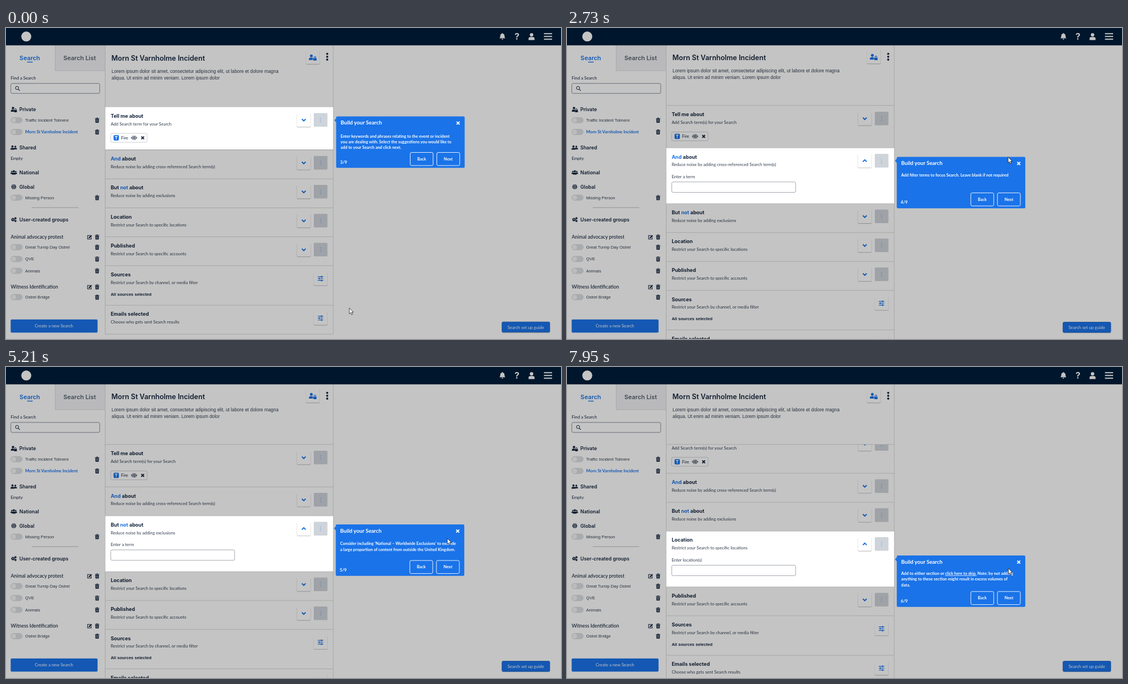
Recreate the animation shown at these times as an HTML page. Size 999x561 px, loop 8000 ms.

```html
<!DOCTYPE html>
<html lang="en">
<head>
<meta charset="utf-8">
<title>Search set up guide</title>
<style>
html, body { margin: 0; width: 100%; height: 100%; overflow: hidden; background: #c4c4c4; }
svg { display: block; width: 100%; height: 100%; }
text { white-space: pre; }
</style>
</head>
<body>
<svg id="stage" viewBox="0 0 999 561"></svg>
<script>
const NAVY = '#16263d', BLUE = '#1a73e8', GREY = '#ced4da', WHITE = '#fff', LINE = '#d3d4d6';
const LOOP = 8000;

// family, weight, size
const FONT = {
  body: ['Lato', 400, 7.72],
  strong: ['Lato', 700, 7.6],
  note: ['Lato', 700, 7.35],
  popTitle: ['Lato', 700, 9.6],
  group: ['Lato', 500, 8.8],
  plain: ['Liberation Sans', 400, 7.6],
  plainBold: ['Liberation Sans', 700, 7.6],
  intro: ['Liberation Sans', 400, 8.36],
  row: ['Inter', 700, 9],
  side: ['Inter', 600, 8.8],
  tab: ['Inter', 600, 10.9],
  title: ['Inter', 600, 12.5],
  help: ['Inter', 700, 16]
};

// y is the middle of the capitals
function text(x, y, str, font = 'body', fill = NAVY, anchor = 'start') {
  const [family, weight, size] = FONT[font];
  return `<text x="${x}" y="${y + size * 0.36}" font-family="'${family}', sans-serif" font-weight="${weight}" ` +
    `font-size="${size}" fill="${fill}" text-anchor="${anchor}">${str}</text>`;
}
const rect = (x, y, w, h, fill, r = 0, more = '') =>
  `<rect x="${x}" y="${y}" width="${w}" height="${h}" rx="${r}" fill="${fill}" ${more}/>`;
const outline = (x, y, w, h, color, r, width = 0.8) =>
  rect(x, y, w, h, 'none', r, `stroke="${color}" stroke-width="${width}"`);
const circle = (x, y, r, fill, more = '') => `<circle cx="${x}" cy="${y}" r="${r}" fill="${fill}" ${more}/>`;
const fillPath = (d, fill = NAVY) => `<path d="${d}" fill="${fill}"/>`;
const stroke = (d, color = NAVY, width = 1, more = '') =>
  `<path d="${d}" fill="none" stroke="${color}" stroke-width="${width}" ${more}/>`;
const at = (x, y, inner, scale = 1) => `<g transform="translate(${x} ${y}) scale(${scale})">${inner}</g>`;

const cross = (x, y, color, r = 2.7) =>
  at(x, y, stroke(`M${-r} ${-r}L${r} ${r}M${r} ${-r}L${-r} ${r}`, color, 1.8));
const person = (color, x = 0, scale = 1) =>
  at(x, 0, circle(0, -2.4, 2.3, color) + fillPath('M-4 4.6V3Q-4 .6 -1.6 .6H1.6Q4 .6 4 3V4.6Z', color), scale);
const padlock = color =>
  at(3, 2, rect(-2.6, -0.8, 5.2, 4, color, 0.6) + stroke('M-1.4 -.6V-1.8A1.4 1.4 0 0 1 1.4 -1.8V-.6', color, 0.9));
const gear = (x, y, r) => at(x, y,
  circle(0, 0, r, 'none', `stroke="${NAVY}" stroke-width="1.6"`) +
  circle(0, 0, r + 1, 'none', `stroke="${NAVY}" stroke-width="1" stroke-dasharray="${(r + 1) * 0.4} ${(r + 1) * 0.385}"`));

const icon = {
  private: person(NAVY, -1.4, 0.95) + rect(0.3, -1.2, 5.6, 6, WHITE) + padlock(NAVY),
  shared: person(NAVY, -2.4, 0.85) + person(NAVY, 2.8, 0.72),
  national: person(NAVY, -3.5, 0.58) + person(NAVY, 3.5, 0.58) + person(NAVY, 0, 0.85),
  global: circle(0, 0, 4.4, NAVY) +
    stroke('M-4.4 -1.5H4.4M-4.4 1.5H4.4M0 -4.4V4.4', WHITE, 0.5) +
    `<ellipse rx="2" ry="4.4" fill="none" stroke="#fff" stroke-width=".5"/>`,
  groups: gear(-1.5, 0, 1.8) + gear(3, -2.4, 0.8) + gear(3, 2.4, 0.8)
};

const trash = y => at(164, y,
  fillPath('M-3.8 -3.6H-1.4L-.9 -4.5H.9L1.4 -3.6H3.8V-2.6H-3.8ZM-3.3 -2H3.3L3 4Q2.9 4.6 2.3 4.6H-2.3Q-2.9 4.6 -3 4Z') +
  stroke('M-1.4 -.9V3.4M0 -.9V3.4M1.4 -.9V3.4', WHITE, 0.5));
const pencil = y => at(150.5, y,
  stroke('M1 -2.8H-3.6V3.8H2.9V.6', NAVY, 1.1) + fillPath('M-1.4 .4L2.5 -3.8L4.3 -2L.3 2L-1.8 2.3Z'));
const toggle = y => rect(8.7, y - 5, 20.6, 10, '#dcdee1', 5, 'stroke="#cfd2d6" stroke-width=".6"') +
  circle(13.8, y, 4.8, '#f4f4f5', 'stroke="#c8cbd0" stroke-width=".5"');

function raised(x, y, w = 24.6, h = 24.6) {
  return rect(x - 0.4, y + 0.6, w + 0.8, h + 0.8, '#000', 2, 'opacity=".13"') +
    rect(x, y + 0.8, w, h, '#000', 2, 'opacity=".12"') + rect(x, y, w, h, WHITE, 1.5);
}

function header() {
  return rect(0, 0, 999, 31.3, '#001c39') + circle(36.5, 15.3, 9, WHITE) +
    at(893.5, 15, fillPath('M-5.4 3.6Q-3.8 2.2 -3.8 -.8Q-3.8 -4 -.8 -4.7V-5.8H.8V-4.7Q3.8 -4 3.8 -.8Q3.8 2.2 5.4 3.6ZM-1.5 4.5H1.5Q1.3 6 0 6Q-1.3 6 -1.5 4.5Z', WHITE)) +
    text(919.7, 15.2, '?', 'help', WHITE, 'middle') +
    at(946, 15.5, person(WHITE, 0, 1.35)) +
    stroke('M968.3 10.2H983M968.3 15.2H983M968.3 20.2H983', WHITE, 2);
}

function sidebar() {
  const heading = (y, name, label) => at(14, y, icon[name]) + text(24, y, label, 'side');
  const item = (y, label, active) => toggle(y) + trash(y) +
    text(34.5, y, label, active ? 'strong' : 'plain', active ? BLUE : '#333f50');
  const group = (y, label) => text(8.4, y, label, 'group') + pencil(y) + trash(y);
  return rect(88.5, 31, 90, 46, '#f0f1f3') + stroke('M88.5 31V77H178.5', LINE, 0.8) +
    text(42.8, 53.7, 'Search', 'tab', BLUE, 'middle') + rect(38, 60.8, 10, 1.4, BLUE) +
    text(132.5, 53.7, 'Search List', 'tab', '#56606f', 'middle') +
    text(8.4, 90.3, 'Find a Search') + outline(8.7, 100, 160, 18, '#66707e', 2.5) +
    circle(19.9, 108.2, 2.9, 'none', `stroke="${NAVY}"`) + stroke('M22 110.4L24.8 113.2', NAVY, 1.2) +
    heading(146.7, 'private', 'Private') +
    item(166.3, 'Traffic Incident Tolmere') + item(187.5, 'Morn St Varnholme Incident', true) +
    heading(215.7, 'shared', 'Shared') + text(8.4, 235, 'Empty') +
    heading(260.5, 'national', 'National') + heading(286.5, 'global', 'Global') +
    item(306, 'Missing Person') + stroke('M46 324H130', '#a9adb3', 0.8) +
    heading(345.6, 'groups', 'User-created groups') +
    group(377, 'Animal advocacy protest') +
    item(395.3, 'Great Turnip Day Ostrel') + item(416.7, 'QVE') + item(438, 'Animals') +
    group(467, 'Witness Identification') + item(485.5, 'Ostrel Bridge') +
    rect(8.4, 525.8, 156.4, 23.6, BLUE, 2) + text(86.3, 537.6, 'Create a new Search', 'body', WHITE, 'middle');
}

const kebab = (x, y, gap, r, color) => [-gap, 0, gap].map(d => circle(x, y + d, r, color)).join('');

function chip(y) {
  const bars = [1, 2, 4, 2.6, 4.2, 3.2, 4, 2, 1]
    .map((h, i) => `M${225.3 + i * 1.3} ${y - h}V${y + h}`).join('');
  return rect(188.5, y - 8, 65.5, 16, WHITE, 2, 'stroke="#bfc3c9" stroke-width=".8"') +
    rect(193.6, y - 4.8, 9.6, 9.6, BLUE, 1.8) + stroke(`M196 ${y - 2.4}H200.8M198.4 ${y - 2.4}V${y + 3}`, WHITE, 1.2) +
    text(207, y, 'Fire') + stroke(bars, NAVY, 0.7) + cross(246, y, NAVY, 2.5);
}

function rowControls(y, open, filter) {
  const top = y - 12.4;
  if (filter) {
    return raised(554, top) + at(566.2, y,
      stroke('M-5 -3.4H5M-5 0H5M-5 3.4H5', BLUE, 1.1) +
      stroke('M1.6 -5V-1.8M-2.2 -1.6V1.6M1.6 1.8V5', BLUE, 1.5));
  }
  const d = open ? -1.7 : 1.7;
  return raised(523.7, top) + stroke(`M532.6 ${y - d}L536 ${y + d}L539.4 ${y - d}`, BLUE, 2) +
    rect(554, top, 24.6, 24.6, GREY, 1.5) + kebab(566.2, y, 3.4, 1.1, '#a3b9da');
}

const blue = s => `<tspan fill="${BLUE}">${s}</tspan>`;
const ROWS = [
  { title: 'Tell me about' },
  { title: blue('And') + ' about', sub: 'Reduce noise by adding cross-referenced Search term(s)' },
  { title: 'But ' + blue('not') + ' about', sub: 'Reduce noise by adding exclusions' },
  { title: 'Location', sub: 'Restrict your Search to specific locations' },
  { title: 'Published', sub: 'Restrict your Search to specific accounts' },
  { title: 'Sources', sub: 'Restrict your Search by channel, or media filter', height: 71.3 },
  { title: 'Emails selected', sub: 'Choose who gets sent Search results' }
];

const STEPS = [
  { from: 0, top: 142.7, focus: 0, popX: 594.3, popY: 159.5, noteY: 35.4, lines: [
    'Enter keywords and phrases relating to the event or incident',
    'you are dealing with. Select the suggestions you would like to',
    'add to your Search and click next.'] },
  { from: 2730, top: 140.1, focus: 1, popX: 593.6, popY: 232.4, noteY: 32.6, lines: [
    'Add filter terms to focus Search. Leave blank if not required'] },
  { from: 5210, top: 140.1, focus: 2, popX: 593.6, popY: 284, noteY: 34.6, lines: [
    'Consider including ‘National – Worldwide Exclusions’ to exclude',
    'a large proportion of content from outside the United Kingdom.'] },
  { from: 7950, top: 115.6, focus: 3, popX: 593.6, popY: 340, noteY: 32.3, lines: [
    'Add to either section or <tspan text-decoration="underline">click here to skip.</tspan> Note: by not adding',
    'anything to these section might result in excess volumes of',
    'data.'] }
];

function popup(step, index) {
  const { popX: x, popY: y } = step;
  const button = (bx, label) => outline(x + bx, y + 65, 41.2, 23.6, WHITE, 2.5, 0.9) +
    text(x + bx + 20.6, y + 76.8, label, 'note', WHITE, 'middle');
  return rect(x, y, 231.3, 92.8, BLUE, 2) + fillPath(`M${x + 0.3} ${y + 3}L${x - 3.2} ${y + 7}L${x + 0.3} ${y + 11}Z`, BLUE) +
    text(x + 8, y + 11.4, 'Build your Search', 'popTitle', WHITE) + cross(x + 219.5, y + 12, WHITE) +
    step.lines.map((s, i) => text(x + 8, y + step.noteY + i * 10.3, s, 'note', WHITE)).join('') +
    text(x + 7.2, y + 82.3, `${index + 3}/9`, 'strong', WHITE) + button(133.3, 'Back') + button(181.2, 'Next');
}

function scene(step, index) {
  const first = index === 0, dy = first ? 0.8 : 0;
  let y = step.top, rows = '', hole;
  ROWS.forEach((row, i) => {
    const open = i > 0 && i === step.focus;
    const height = i === 0 ? (first ? 77.3 : 76.2) : open ? 100.4 : row.height || 52.2;
    const sub = row.sub || `Add Search ${first ? 'term' : 'term(s)'} for your Search`;
    rows += text(188.4, y + 16, row.title, 'row') + text(188.4, y + 30.4, sub, 'body', '#333f50') +
      rowControls(y + 23.2, open, i > 4) + stroke(`M178.5 ${y + height}H589`, LINE, 0.9);
    if (i === 0) rows += chip(y + 55.4);
    if (i === 5) rows += text(188.4, y + 51.2, 'All sources selected', 'plainBold');
    if (open) {
      rows += text(188.4, y + 52.2, i === 3 ? 'Enter location(s)' : 'Enter a term', 'body', '#333f50') +
        outline(188.6, y + 61.4, 223, 18.8, '#8b919b', 2.5);
    }
    if (i === step.focus) hole = `M178.5 ${y}H589V${y + height - (first ? 1 : 0)}H178.5Z`;
    y += height;
  });
  const bottom = Math.min(y, 561);
  return rect(0, 31, 999, 530, WHITE) + sidebar() +
    `<g clip-path="url(#list)">${rows}</g>` +
    stroke(`M178.5 31V${bottom}M589 31V${bottom}`, LINE, 0.9) +
    (first ? '' : stroke('M178.5 139.7H589', LINE, 0.9)) +
    text(189.8, 53.8 + dy, 'Morn St Varnholme Incident', 'title') +
    text(190, 77 + dy, 'Lorem ipsum dolor sit amet, consectetur adipiscing elit, ut labore et dolore magna', 'intro', '#333f50') +
    text(190, 89.4 + dy, 'aliqua. Ut enim ad minim veniam. Lorem ipsum dolor', 'intro', '#333f50') +
    raised(540, 39.4 + dy) + at(552, 52 + dy,
      person(BLUE, -2.4, 1.1) + rect(0.4, -1.4, 6, 7, WHITE) + at(0.6, 0, padlock(BLUE), 1.15)) +
    kebab(578.2, 51.8, 5.2, 1.9, NAVY) +
    raised(892.8, 530.6 - dy / 2, 86, 18.6) + rect(892.8, 530.6 - dy / 2, 86, 18.6, BLUE, 2, 'stroke="#1459b8" stroke-width=".8"') +
    text(935.7, 540.2 - dy / 2, 'Search set up guide', 'body', WHITE, 'middle') + header() +
    `<path d="M0 0H999V561H0Z${hole}" fill-rule="evenodd" opacity=".23"/>` + popup(step, index);
}

const ARROW = 'M0 0V10.6L2.4 8.4L4 12.1L5.8 11.3L4.2 7.7H7.4Z';
const HAND = 'M-1.2 1.2Q-1.2 0 0 0Q1.2 0 1.2 1.2V5Q3 4.4 3.6 5.4Q5.2 5 5.6 6.2Q7 6 7 7.4V10Q6.8 12 5.8 13.6H-.4Q-2 11.5 -3.6 9Q-4 7.6 -2.6 7.6L-1.2 8.8Z';

const stage = document.getElementById('stage');
stage.innerHTML = '<defs><clipPath id="list"><rect x="178" y="139.7" width="412" height="422"/></clipPath></defs>' +
  STEPS.map((step, i) => `<g class="step">${scene(step, i)}</g>`).join('') +
  `<g id="pointer">${circle(0, 0, 9.5, WHITE, 'id="click" opacity=".3"')}` +
  `<path id="shape" fill="#fff" stroke="#1c1c1c" stroke-width=".8" stroke-linejoin="round"/></g>`;
const groups = [...stage.querySelectorAll('.step')];
const pointer = document.getElementById('pointer');
const click = document.getElementById('click');
const shape = document.getElementById('shape');

const easeIn = u => u ** 1.3;
const easeOut = u => 1 - (1 - u) ** 1.5;
const easeBoth = u => u * u * (3 - 2 * u);

// start, end, target x, target y, sideways swing, easing
const MOVES = [
  [270, 1070, 702, 319, 0, easeIn],
  [1070, 1740, 794, 232.7, 0, easeOut],
  [3330, 4020, 794.3, 309, -8, easeBoth],
  [5480, 6340, 796, 360.6, 0, easeBoth],
  [7949, 7950, 794.4, 363, 0, easeBoth]
];
const HANDS = [[1740, 2730], [4020, 4220], [4350, 5000], [6340, 7490]];
const CLICKS = [[2530, 2670], [4870, 5000], [7360, 7490]];
const within = (spans, t) => spans.some(([a, b]) => t >= a && t < b);

function position(t) {
  let x = 618, y = 505;
  for (const [start, end, tx, ty, swing, ease] of MOVES) {
    if (t < start) break;
    const u = Math.min(1, (t - start) / (end - start)), k = ease(u);
    x += (tx - x) * k + swing * Math.sin(Math.PI * k);
    y += (ty - y) * k;
  }
  return [x, y];
}

function draw(t) {
  const current = STEPS.filter(s => t >= s.from).length - 1;
  groups.forEach((g, i) => { g.style.display = i === current ? '' : 'none'; });
  pointer.setAttribute('transform', `translate(${position(t).join(' ')})`);
  shape.setAttribute('d', within(HANDS, t) ? HAND : ARROW);
  click.style.display = within(CLICKS, t) ? '' : 'none';
}

const begun = performance.now();
function tick() {
  draw((performance.now() - begun) % LOOP);
  requestAnimationFrame(tick);
}
tick();
</script>
</body>
</html>
```
